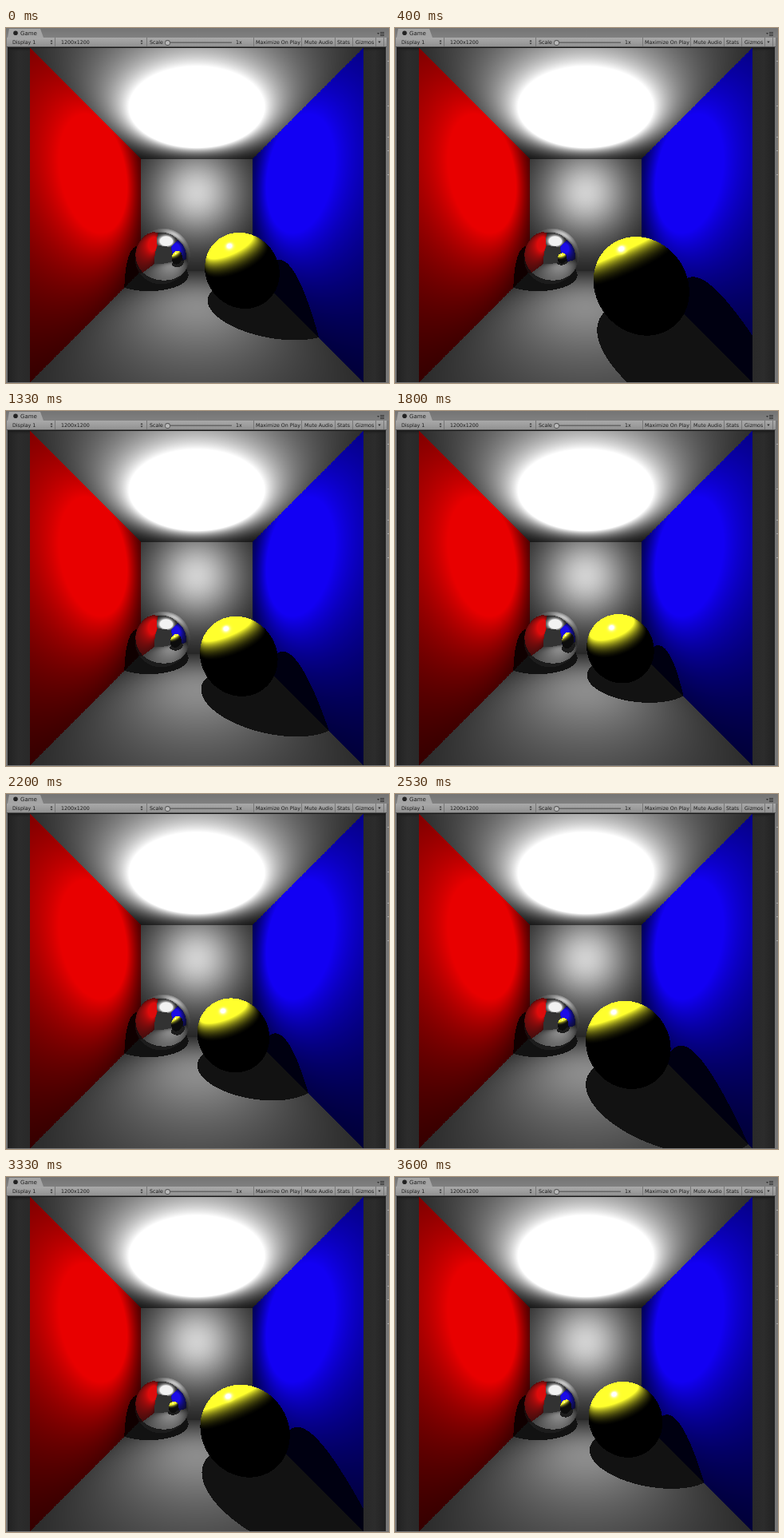
Animation, 480 px wide and 444 px high, one loop 3.67 s. Source, as an HTML page with a canvas:

```html
<!DOCTYPE html>
<html lang="en">
<head>
<meta charset="utf-8">
<title>Ray traced box</title>
<style>
  html, body { margin: 0; width: 100%; height: 100%; overflow: hidden; background: #262626; }
  canvas { display: block; }
</style>
</head>
<body>
<canvas id="stage" width="480" height="444"></canvas>
<script>
const ctx = document.getElementById('stage').getContext('2d');
const SIZE = 418, LEFT = 30, TOP = 25, HALF = SIZE / 2;
const LOOP = 3670, FRAMES = 55;
const FIRST_MOVING_ROW = 218;

// Box spans -1..1 in x and y (y down) and 1..3 in z; the camera sits at the origin.
const light = { x: 0, y: -0.4, z: 1.8 };
const mirror = { x: -0.5, y: 0.6, z: 2.5, r: 0.4 };
const ball = { x: 0.5, y: 0.6, z: 1.9, r: 0.4 };
const SHADOW = 18, OUTSIDE = 42;
const image = ctx.createImageData(SIZE, SIZE);
const out = [0, 0, 0];

function setColor(r, g, b) { out[0] = r; out[1] = g; out[2] = b; }

function hit(s, ox, oy, oz, dx, dy, dz) {
  const x = ox - s.x, y = oy - s.y, z = oz - s.z;
  const a = dx * dx + dy * dy + dz * dz;
  const b = x * dx + y * dy + z * dz;
  const disc = b * b - a * (x * x + y * y + z * z - s.r * s.r);
  if (disc < 0) return Infinity;
  const t = (-b - Math.sqrt(disc)) / a;
  return t > 1e-4 ? t : Infinity;
}

function shadowed(x, y, z) {
  const dx = light.x - x, dy = light.y - y, dz = light.z - z;
  return hit(ball, x, y, z, dx, dy, dz) < 1 || hit(mirror, x, y, z, dx, dy, dz) < 1;
}

function shadeWall(x, y, z, side) {
  const dx = light.x - x, dy = light.y - y, dz = light.z - z;
  const d2 = dx * dx + dy * dy + dz * dz;
  const height = Math.abs(side === 'x' ? dx : side === 'y' ? dy : dz);
  const level = height / (d2 * Math.sqrt(d2)) / 0.64;
  const dark = shadowed(x, y, z);
  if (side === 'x') {
    const v = dark ? 0.07 : Math.min(1, level);
    if (x < 0) setColor(232 * v, 0, 0);
    else setColor(18 * v * v, 0, 243 * v);
  } else {
    const v = dark ? SHADOW : Math.max(SHADOW, 255 * Math.min(1, Math.pow(0.79 * level, 1.3)));
    setColor(v, v, v);
  }
}

function shadeBall(x, y, z, dx, dy, dz) {
  const nx = (x - ball.x) / ball.r, ny = (y - ball.y) / ball.r, nz = (z - ball.z) / ball.r;
  let lx = light.x - x, ly = light.y - y, lz = light.z - z;
  const d = Math.hypot(lx, ly, lz);
  lx /= d; ly /= d; lz /= d;
  const facing = nx * lx + ny * ly + nz * lz;
  if (facing <= 0) return setColor(0, 0, 0);
  const len = Math.hypot(dx, dy, dz);
  const hx = lx - dx / len, hy = ly - dy / len, hz = lz - dz / len;
  const half = (nx * hx + ny * hy + nz * hz) / Math.hypot(hx, hy, hz);
  const shine = 330 * Math.pow(Math.max(0, half), 130);
  const v = Math.min(1, Math.pow(facing / (d * d) / 0.64, 1.3));
  setColor(255 * v + shine, 255 * v + shine, 45 * v + shine);
}

function trace(ox, oy, oz, dx, dy, dz, depth) {
  const tBall = hit(ball, ox, oy, oz, dx, dy, dz);
  const tMirror = depth ? Infinity : hit(mirror, ox, oy, oz, dx, dy, dz);
  const tx = (Math.sign(dx) - ox) / dx, ty = (Math.sign(dy) - oy) / dy;
  const tz = ((dz > 0 ? 3 : 1) - oz) / dz;
  const t = Math.min(tBall, tMirror, tx, ty, tz);
  const x = ox + dx * t, y = oy + dy * t, z = oz + dz * t;
  if (t === tMirror) {
    const nx = (x - mirror.x) / mirror.r, ny = (y - mirror.y) / mirror.r, nz = (z - mirror.z) / mirror.r;
    const k = 2 * (dx * nx + dy * ny + dz * nz);
    trace(x, y, z, dx - k * nx, dy - k * ny, dz - k * nz, 1);
    for (let i = 0; i < 3; i++) out[i] = out[i] * 0.9 + 12;
  } else if (t === tBall) shadeBall(x, y, z, dx, dy, dz);
  else if (t === tx) shadeWall(x, y, z, 'x');
  else if (t === ty) shadeWall(x, y, z, 'y');
  else if (dz > 0) shadeWall(x, y, z, 'z');
  else setColor(OUTSIDE, OUTSIDE, OUTSIDE);
}

function renderBox(firstRow) {
  let p = firstRow * SIZE * 4;
  for (let row = firstRow; row < SIZE; row++) {
    for (let col = 0; col < SIZE; col++) {
      trace(0, 0, 0, (col + 0.5) / HALF - 1, (row + 0.5) / HALF - 1, 1, 0);
      image.data[p++] = out[0];
      image.data[p++] = out[1];
      image.data[p++] = out[2];
      image.data[p++] = 255;
    }
  }
  ctx.putImageData(image, LEFT, TOP);
}

// Time in ms, swing phase in degrees, sideways position.
const keys = [
  [0, -301, 0.492], [800, -172, 0.45], [1330, -74, 0.435], [1800, -4, 0.412],
  [2530, 96, 0.4], [3000, 188, 0.437], [3600, 301, 0.432], [3670, 313, 0.432]
];

function moveBall(ms) {
  let i = 1;
  while (i < keys.length - 1 && keys[i][0] < ms) i++;
  const a = keys[i - 1], b = keys[i];
  const u = (ms - a[0]) / (b[0] - a[0]);
  const phase = a[1] + (b[1] - a[1]) * u;
  ball.x = a[2] + (b[2] - a[2]) * u;
  ball.z = 1.71 + 0.35 * Math.cos(phase * Math.PI / 180);
}

function rect(x, y, w, h, fill) {
  ctx.fillStyle = fill;
  ctx.fillRect(x, y, w, h);
}

function gradient(x0, y0, x1, y1, ...colors) {
  const g = ctx.createLinearGradient(x0, y0, x1, y1);
  colors.forEach((c, i) => g.addColorStop(i / (colors.length - 1), c));
  return g;
}

function label(text, x, y, size = 6.3) {
  ctx.font = size + 'px "DejaVu Sans", sans-serif';
  ctx.fillStyle = '#1c1c1c';
  ctx.fillText(text, x, y);
}

function triangle(x, y, w, h) {
  ctx.fillStyle = '#333';
  ctx.beginPath();
  ctx.moveTo(x - w / 2, y);
  ctx.lineTo(x + w / 2, y);
  ctx.lineTo(x, y + h);
  ctx.fill();
}

function disc(x, y, r, fill) {
  ctx.fillStyle = fill;
  ctx.beginPath();
  ctx.arc(x, y, r, 0, 7);
  ctx.fill();
}

function drawWindow() {
  rect(0, 0, 480, 444, '#777');
  rect(0, 0, 480, 12, gradient(0, 0, 0, 12, '#747474', '#808080'));
  ctx.fillStyle = '#a4a4a4';
  ctx.beginPath();
  ctx.moveTo(2, 12);
  ctx.lineTo(4, 1);
  ctx.lineTo(43, 1);
  ctx.lineTo(47, 12);
  ctx.fill();
  disc(12, 6.2, 2.8, '#222');
  label('Game', 18, 9, 7);
  triangle(466.5, 6, 3, 2);
  for (let y = 5; y < 10; y += 2) rect(469, y, 5, 1, '#333');

  rect(1, 12, 476, 12, gradient(0, 12, 0, 24, '#a9a9a9', '#909090'));
  rect(1, 23, 476, 1, '#555');
  for (const x of [61, 176, 310, 370, 412, 434, 463, 473]) rect(x, 12, 1, 11, '#777');
  label('Display 1', 8, 20);
  label('1200x1200', 69, 20);
  label('Scale', 180, 20);
  label('1x', 288, 20);
  label('Maximize On Play', 313, 20);
  label('Mute Audio', 374, 20);
  label('Stats', 415, 20);
  label('Gizmos', 438, 20);
  for (const x of [57, 170]) {
    triangle(x, 17, 3, -2);
    triangle(x, 18.5, 3, 2);
  }
  triangle(468, 16.5, 3.5, 2.5);
  rect(200, 17.5, 83, 1.5, '#666');
  disc(202.5, 18.5, 3.4, '#555');
  disc(202.5, 18.5, 2.6, '#b8b8b8');

  rect(2, 24, 474, 419, '#282828');
  rect(2, 24, 28, 419, gradient(2, 0, 30, 0, '#222', '#2c2c2c', '#292929'));
  rect(448, 24, 28, 419, gradient(448, 0, 476, 0, '#292929', '#2c2c2c', '#222'));
  rect(2, 24, 474, 6, gradient(0, 24, 0, 30, '#181818', '#28282800'));
  for (const y of [41, 97, 136, 153, 183]) rect(478, y, 2, 1, '#aaa');
}

let shown = -1;
function tick() {
  const index = Math.floor((performance.now() % LOOP) * FRAMES / LOOP + 0.12) % FRAMES;
  if (index !== shown) {
    moveBall(index * LOOP / FRAMES);
    renderBox(shown < 0 ? 0 : FIRST_MOVING_ROW);
    shown = index;
  }
  requestAnimationFrame(tick);
}

drawWindow();
tick();
</script>
</body>
</html>
```
